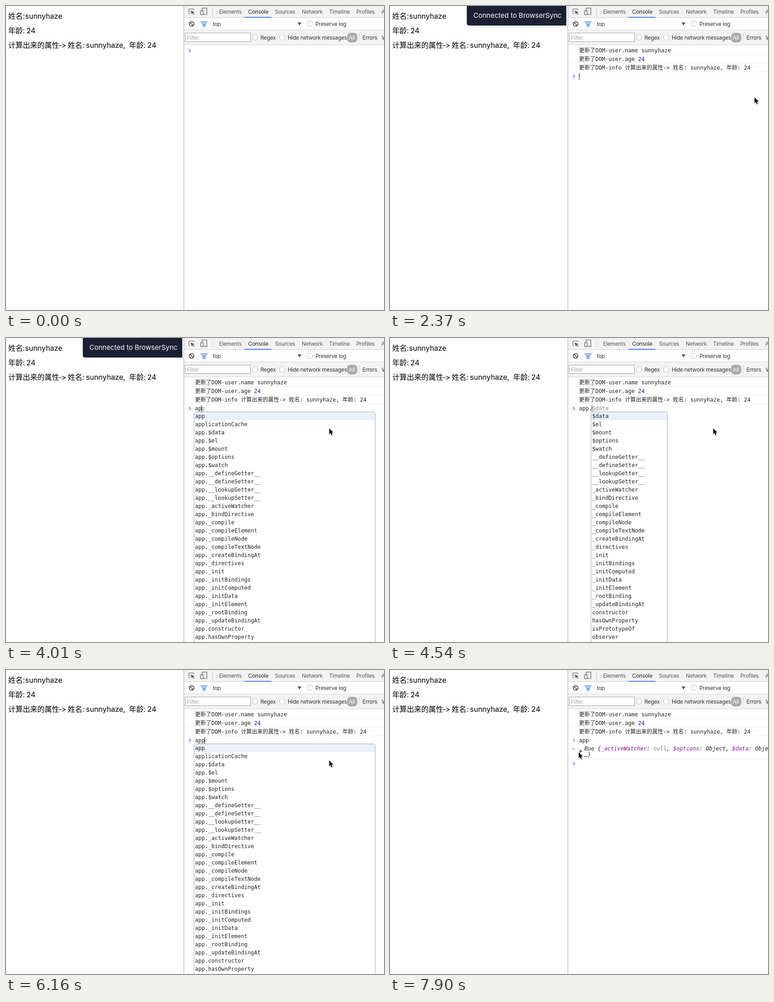
An HTML page with a canvas that plays this animation: 832 by 669 pixels, repeating every 8 s.

```html
<!DOCTYPE html>
<html lang="zh-CN">
<head>
<meta charset="utf-8">
<title>Console demo</title>
<style>
html, body { margin: 0; width: 100%; height: 100%; overflow: hidden; background: #fefefe; }
canvas { display: block; }
</style>
</head>
<body>
<canvas id="stage" width="832" height="669"></canvas>
<script>
const ctx = document.getElementById('stage').getContext('2d');
const LOOP = 8000;
const CJK = '"Noto Sans CJK SC", "Noto Sans CJK", sans-serif';
const PAGE = `16px Inter, ${CJK}`;
const UI = `12px Inter, ${CJK}`;
const MONO = '12px "DejaVu Sans Mono", "Noto Sans CJK SC", "Noto Sans CJK", monospace';
const CHAR = 7.224;
const USER = 'sunnyhaze';
const INK = '#222';

const MEMBERS = ('$data $el $mount $options $watch __defineGetter__ __defineSetter__ __lookupGetter__ ' +
  '__lookupSetter__ _activeWatcher _bindDirective _compile _compileElement _compileNode ' +
  '_compileTextNode _createBindingAt _directives _init _initBindings _initComputed _initData ' +
  '_initElement _rootBinding _updateBindingAt constructor hasOwnProperty isPrototypeOf observer').split(' ');
const HISTORY = MEMBERS.map(name => 'app.' + name);
const COMPLETIONS = {
  a: ['app', 'applicationCache', 'addEventListener', 'alert', 'atob', ...HISTORY],
  ap: ['app', 'applicationCache', ...HISTORY],
  app: ['app', 'applicationCache', ...HISTORY]
};

// Each entry holds from its time until the next one.
const TYPED = [[0, ''], [3720, 'a'], [4010, 'ap'], [4220, 'app'], [4540, 'app.'], [6100, 'app'], [6420, '']];
const POPUP = [[0, ''], [3780, 'a'], [4010, 'ap'], [4220, 'app'], [4540, 'members'], [6160, 'app'], [6330, '']];
const PAGE_STATE = [[0, 'ready'], [1790, 'blank'], [1850, 'raw'], [1910, 'ready']];
const CARET = [[0, 0], [840, 1], [1310, 0], [1610, 1], [2590, 0], [3070, 1], [3190, 0],
  [3310, 1], [6920, 0], [7420, 1], [7900, 0]];
const MOVES = [
  { step: 54, keys: [[2320, 802, 200], [2428, 755, 200], [2590, 711, 198]] },
  { step: 60, keys: [[6750, 702, 198], [6990, 560, 170], [7230, 382, 129], [7290, 357, 127],
    [7410, 372, 152], [7530, 432, 195], [7650, 428, 192], [7890, 415, 180]] }
];

function at(track, t) {
  let value = track[0][1];
  for (const [start, next] of track) if (t >= start) value = next;
  return value;
}

function pointer(t) {
  const move = MOVES.filter(m => t >= m.keys[0][0]).pop();
  if (!move) return null;
  const { step, keys } = move, start = keys[0][0];
  const time = start + Math.floor((t - start) / step) * step;
  const i = keys.findIndex(k => k[0] > time);
  if (i < 0) return keys[keys.length - 1].slice(1);
  const [t0, x0, y0] = keys[i - 1], [t1, x1, y1] = keys[i];
  const p = (time - t0) / (t1 - t0);
  return [Math.round(x0 + (x1 - x0) * p), Math.round(y0 + (y1 - y0) * p)];
}

function rect(x, y, w, h, color) {
  ctx.fillStyle = color;
  ctx.fillRect(x, y, w, h);
}

function text(str, x, y, font = MONO, color = INK, spacing = 0) {
  ctx.font = font;
  ctx.letterSpacing = spacing + 'px';
  ctx.fillStyle = color;
  ctx.fillText(str, x, y);
}

const ui = (str, x, y, color = '#333') => text(str, x, y, UI, color, -0.3);

function shape(points, fill, stroke, width = 1, closed = true) {
  ctx.beginPath();
  points.forEach(([x, y]) => ctx.lineTo(x, y));
  if (closed) ctx.closePath();
  if (stroke) {
    ctx.strokeStyle = stroke;
    ctx.lineWidth = width;
    ctx.stroke();
  }
  if (fill) {
    ctx.fillStyle = fill;
    ctx.fill();
  }
}

function box(x, y, w, h, radius, fill, stroke) {
  ctx.beginPath();
  ctx.roundRect(x, y, w, h, radius);
  ctx.fillStyle = fill;
  ctx.fill();
  if (stroke) {
    ctx.strokeStyle = stroke;
    ctx.lineWidth = 1;
    ctx.stroke();
  }
}

const chevron = (y, color) =>
  shape([[402.5, y - 3.5], [406.5, y], [402.5, y + 3.5]], null, color, 1.5, false);

function drawPage(state, toast) {
  const line = (y, ...parts) => parts.forEach(([x, str]) => text(str, x, y, PAGE, '#000'));
  if (state === 'raw') {
    line(28, [5, '姓名:'], [41, '{{user.name}}']);
    line(60, [5, '年龄:'], [45, '{{user.age}}']);
    line(92, [5, '{{info}}']);
  } else if (state === 'ready') {
    line(28, [5, '姓名:'], [42, USER]);
    line(60, [5, '年龄:'], [45, '24']);
    line(92, [5, '计算出来的属性'], [116, '-'], [122, '>'], [136, '姓名:'],
      [176, USER + ','], [271, '年龄:'], [311, '24']);
  }
  if (toast) {
    box(169, 0, 219, 43, [0, 0, 0, 5], '#1b2032');
    text('Connected to BrowserSync', 183.5, 25.5, `15px Inter, ${CJK}`, '#fff');
  }
}

function drawIcons() {
  const gray = '#5a5a5a';
  shape([[405, 17.5], [402.5, 17.5], [402.5, 6.5], [413.5, 6.5], [413.5, 9]], null, gray, 1, false);
  shape([[406, 10], [415, 13.5], [411.8, 14.8], [415, 18], [413.8, 19], [410.7, 15.8], [409.3, 19]], gray);
  ctx.strokeStyle = gray;
  ctx.lineWidth = 1.2;
  ctx.strokeRect(431.5, 4.5, 10.5, 14);
  rect(428, 10, 7, 10, '#f3f3f3');
  ctx.strokeRect(428.5, 10.5, 5.5, 8.5);

  ctx.beginPath();
  ctx.arc(408.5, 39.5, 5.2, 0, Math.PI * 2);
  ctx.strokeStyle = '#4a4a4a';
  ctx.lineWidth = 1.8;
  ctx.stroke();
  shape([[404.8, 35.8], [412.2, 43.2]], null, '#4a4a4a', 1.8, false);

  shape([[429.8, 34.7], [442.2, 34.7], [438.2, 40], [438.2, 45.3], [433.8, 45.3], [433.8, 40]],
    '#b5cffb', '#2f73ea', 1.6);
  rect(433, 40, 6, 1.4, '#2f73ea');
}

function drawToolbar() {
  rect(392, 0, 440, 25, '#f3f3f3');
  rect(392, 25, 440, 1, '#ccc');
  rect(392, 52, 440, 1, '#dadada');
  rect(392, 53, 440, 32, '#f3f3f3');
  rect(392, 85, 440, 1, '#d5d5d5');
  rect(391, 0, 1, 669, '#a3a3a3');
  rect(454, 4, 1, 17, '#ccc');
  rect(777, 61, 1, 17, '#ccc');
  rect(525, 24, 59, 2, '#4580e6');
  drawIcons();

  const tabs = [['Elements', 469], ['Console', 533], ['Sources', 592], ['Network', 651],
    ['Timeline', 711], ['Profiles', 771], ['Audits', 826]];
  tabs.forEach(([name, x]) => ui(name, x, 17, name === 'Console' ? '#222' : '#555'));

  ui('top', 455, 44);
  shape([[642, 36], [650, 36], [646, 43]], '#555');
  ui('Preserve log', 681, 44);

  ctx.fillStyle = '#fff';
  ctx.fillRect(394, 59, 145, 20);
  ctx.strokeStyle = '#a0a0a0';
  ctx.lineWidth = 1;
  ctx.strokeRect(394.5, 59.5, 144, 19);
  ui('Filter', 398, 74, '#a9a9a9');
  ui('Regex', 560, 74);
  ui('Hide network messages', 620, 74);
  box(751, 59, 22, 21, 7, '#a9a9a9');
  ui('All', 754.5, 74, '#fff');
  ui('Errors', 784.5, 74);
  ui('Warnings', 827, 74);
  [[663.5, 33.5], [542.5, 63.5], [602.5, 63.5]].forEach(([x, y]) => box(x, y, 11, 11, 2.5, '#fff', '#c2c2c2'));
}

function drawLogs() {
  text(`更新了DOM-user.name ${USER}`, 416, 102);
  text('更新了DOM-user.age', 416, 121);
  text('24', 416 + 36 + 13 * CHAR, 121, MONO, '#1c00cf');
  text(`更新了DOM-info 计算出来的属性-> 姓名: ${USER}, 年龄: 24`, 416, 140);
  [106, 125, 144].forEach(y => rect(392, y, 440, 1, '#f0f0f0'));
}

function drawResult() {
  const font = 'italic ' + MONO;
  chevron(155, '#9a9a9a');
  text('app', 416, 159);
  shape([[405, 170], [401.5, 173], [405, 176]], null, '#aaa', 1.2, false);
  rect(406, 172.3, 1.6, 1.6, '#aaa');
  shape([[417, 175], [424, 179], [417, 183]], '#727272');

  const purple = '#881391';
  const parts = [['Bue {', INK], ['_activeWatcher', purple], [': ', INK], ['null', '#808080'],
    [', ', INK], ['$options', purple], [': Object, ', INK], ['$data', purple], [': Object, ', INK]];
  let x = 428;
  for (const [str, color] of parts) {
    text(str, x, 177, font, color);
    x += str.length * CHAR;
  }
  text('…}', 428, 191, font);
  rect(392, 195, 440, 1, '#f0f0f0');
}

function drawPopup(kind) {
  const members = kind === 'members';
  const x = members ? 442 : 413, w = members ? 168 : 399;
  const items = members ? MEMBERS : COMPLETIONS[kind];
  box(x + 0.5, 162.5, w, 520, 3, '#fff', '#a6a6a6');
  rect(x + 1, 163, w - 1, 18, '#ebf1fb');
  items.slice(0, 28).forEach((name, i) => text(name, x + 3, 176 + i * 18));
}

function drawPrompt(t, y) {
  const typed = at(TYPED, t), popup = at(POPUP, t);
  const end = 416 + typed.length * CHAR;
  chevron(y, '#3b7fe0');
  text(typed, 416, y + 4);
  if (popup) {
    const hint = popup === 'members' ? (typed === 'app.' ? '$data' : '') : 'app'.slice(typed.length);
    text(hint, end, y + 4, MONO, '#8a8a8a');
    drawPopup(popup);
  }
  if (at(CARET, t)) rect(Math.floor(end), y - 7, 1, 14, '#000');
}

function drawPointer(x, y) {
  ctx.save();
  ctx.translate(x, y);
  ctx.lineJoin = 'round';
  const arrow = [[0.5, 1], [0.5, 13.5], [3.2, 11], [5.2, 15.7], [7.4, 14.8], [5.4, 10.2], [9.2, 10]];
  ctx.shadowColor = 'rgba(0,0,0,.35)';
  ctx.shadowBlur = 2;
  ctx.shadowOffsetY = 1;
  shape(arrow, null, '#fff', 2);
  ctx.shadowColor = 'transparent';
  shape(arrow, '#000');
  ctx.restore();
}

function draw(t) {
  rect(0, 0, 832, 669, '#fefefe');
  drawPage(at(PAGE_STATE, t), t >= 2080 && t < 4130);
  drawToolbar();
  const logged = t >= 1910, evaluated = t >= 6420;
  if (logged) drawLogs();
  if (evaluated) drawResult();
  drawPrompt(t, evaluated ? 206 : logged ? 155 : 98);
  const tip = pointer(t);
  if (tip) drawPointer(...tip);
}

const origin = performance.now();
function tick() {
  draw((performance.now() - origin) % LOOP);
  requestAnimationFrame(tick);
}
tick();
</script>
</body>
</html>
```
